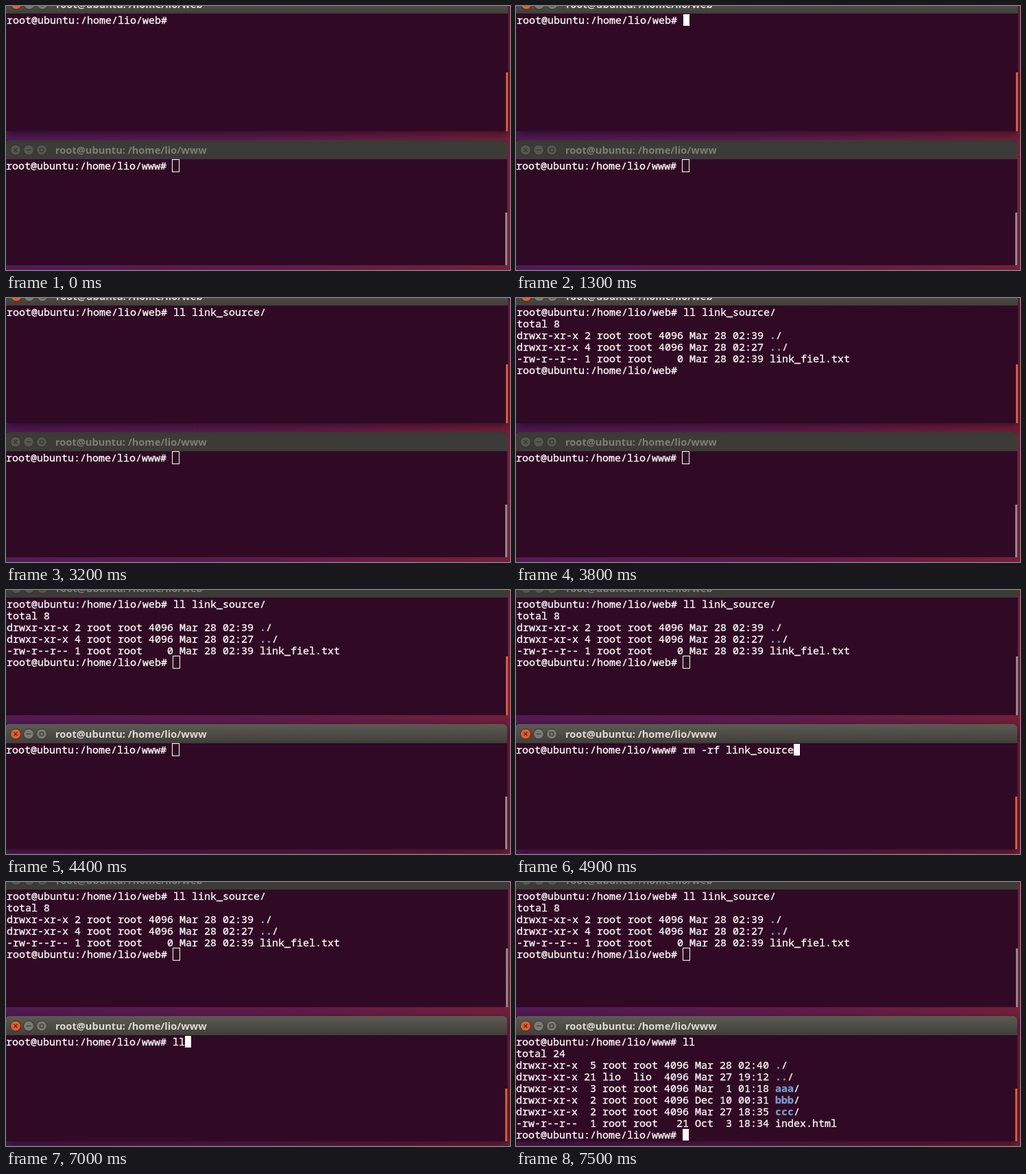
An HTML page that plays this animation: 735x386 px, repeating every 8 s.

```html
<!DOCTYPE html>
<html lang="en">
<head>
<meta charset="utf-8">
<title>Two terminals</title>
<style>
  html, body { margin: 0; width: 100%; height: 100%; overflow: hidden; }
  #stage {
    position: relative; width: 735px; height: 386px; overflow: hidden;
    background: linear-gradient(90deg, #511a55, #5f1c4a 55%, #74203a);
  }
  .window {
    position: absolute; left: 0; height: 183px;
    border-radius: 0 6px 0 0; background: #300a24;
  }
  #web { top: -17px; width: 732px; height: 200px; --x: 1px; }
  #www { top: 196px; width: 731px; --x: 0px; }
  .window.active { z-index: 1; box-shadow: 0 4px 14px rgba(20, 0, 20, .6); }

  .bar {
    position: relative; height: 28px; border-radius: 4px 6px 0 0;
    background: #3c3b37; color: #807d78;
    font: bold 14.6px/29px "Noto Sans", "Open Sans", sans-serif; white-space: pre;
  }
  .bar span { position: absolute; left: calc(72px + var(--x)); top: 0; }
  .bar svg { position: absolute; left: var(--x); top: 0; }
  .bar circle { fill: #575650; stroke: #32312d; }
  .bar path { fill: none; stroke: #32312d; stroke-width: 1.2; }
  .active .bar { background: linear-gradient(#5b5a53, #403f3a); color: #dfdbd2; }
  .active .bar circle { fill: #7b7a72; }
  .active .bar circle:first-child { fill: #ea5a2e; }

  pre {
    position: absolute; left: var(--x); top: 29px; margin: 0; color: #fff;
    font: 15px/17px "Noto Sans Mono", "DejaVu Sans Mono", monospace;
    -webkit-text-stroke: .3px;
  }
  pre b { color: #729fcf; }
  pre i { display: inline-block; vertical-align: top; width: 9px; height: 17px; }
  pre i.solid { background: #fff; }
  pre i.hollow { margin: -1px; border: 1px solid #fff; }
  .scroll { position: absolute; right: 0; bottom: 0; width: 3px; height: 77px; background: #8d8888; }
  #web .scroll { height: 86px; }
  .live .scroll { background: #dd5a30; }
</style>
</head>
<body>
<div id="stage"></div>
<script>
const LOOP = 8000;
const TITLE_SWITCH = 4400, INPUT_SWITCH = 4500;
const LINK_CMD = 'll link_source/';
const RM_CMD = 'rm -rf link_source';
const prompt = dir => `root@ubuntu:/home/lio/${dir}# `;

const webList = `${LINK_CMD}
total 8
drwxr-xr-x 2 root root 4096 Mar 28 02:39 ./
drwxr-xr-x 4 root root 4096 Mar 28 02:27 ../
-rw-r--r-- 1 root root    0 Mar 28 02:39 link_fiel.txt
${prompt('web')}`;

const wwwList = `ll
total 24
drwxr-xr-x  5 root root 4096 Mar 28 02:40 ./
drwxr-xr-x 21 lio  lio  4096 Mar 27 19:12 ../
drwxr-xr-x  3 root root 4096 Mar  1 01:18 aaa/
drwxr-xr-x  2 root root 4096 Dec 10 00:31 bbb/
drwxr-xr-x  2 root root 4096 Mar 27 18:35 ccc/
-rw-r--r--  1 root root   21 Oct  3 18:34 index.html
${prompt('www')}`;

// Each step: start time, text after the first prompt, cursor style
const steps = {
  web: [
    [0, '', 'off'], [200, '', 'solid'], [800, '', 'off'],
    [1300, '', 'solid'], [1900, '', 'off'],
    [2300, 'clear', 'solid'], [2700, LINK_CMD, 'solid'], [3200, LINK_CMD, 'off'],
    [3300, webList, 'solid'], [3800, webList, 'off'], [4400, webList, 'hollow']
  ],
  www: [
    [0, '', 'hollow'], [4500, '', 'solid'],
    [4900, RM_CMD, 'solid'], [5400, RM_CMD, 'off'],
    [5800, 'll', 'solid'], [6300, 'll', 'off'], [6400, 'll', 'solid'],
    [6500, 'clear', 'solid'], [7000, 'll', 'solid'], [7500, wwwList, 'solid']
  ]
};

function makeWindow(dir) {
  const el = document.createElement('div');
  el.id = dir;
  el.innerHTML = `<div class="bar"><svg width="64" height="28">
    <circle cx="14" cy="14.5" r="7.5"/><circle cx="33" cy="14.5" r="7.5"/><circle cx="52" cy="14.5" r="7.5"/>
    <path d="M11.5 12l5 5m0-5l-5 5M29.5 14.5h7M49.5 12h5v5h-5z"/></svg>
    <span>root@ubuntu: /home/lio/${dir}</span></div><pre></pre><div class="scroll"></div>`;
  document.getElementById('stage').append(el);
  return { el, dir, screen: el.querySelector('pre'), step: null };
}

const windows = Object.keys(steps).map(makeWindow);

function draw(now) {
  const t = now % LOOP;
  for (const win of windows) {
    const { el, dir, screen } = win;
    const focused = time => (t < time) === (dir === 'web');
    el.className = 'window' + (focused(TITLE_SWITCH) ? ' active' : '') +
      (focused(INPUT_SWITCH) ? ' live' : '');
    const step = steps[dir].findLast(s => s[0] <= t);
    if (step === win.step) continue;
    win.step = step;
    const [, text, cursor] = step;
    screen.innerHTML = (prompt(dir) + text).replace(/^(d.* )(\S+)\/$/gm, '$1<b>$2</b>/') +
      `<i class="${cursor}"></i>`;
  }
}

function tick() {
  draw(performance.now());
  requestAnimationFrame(tick);
}
tick();
</script>
</body>
</html>
```
